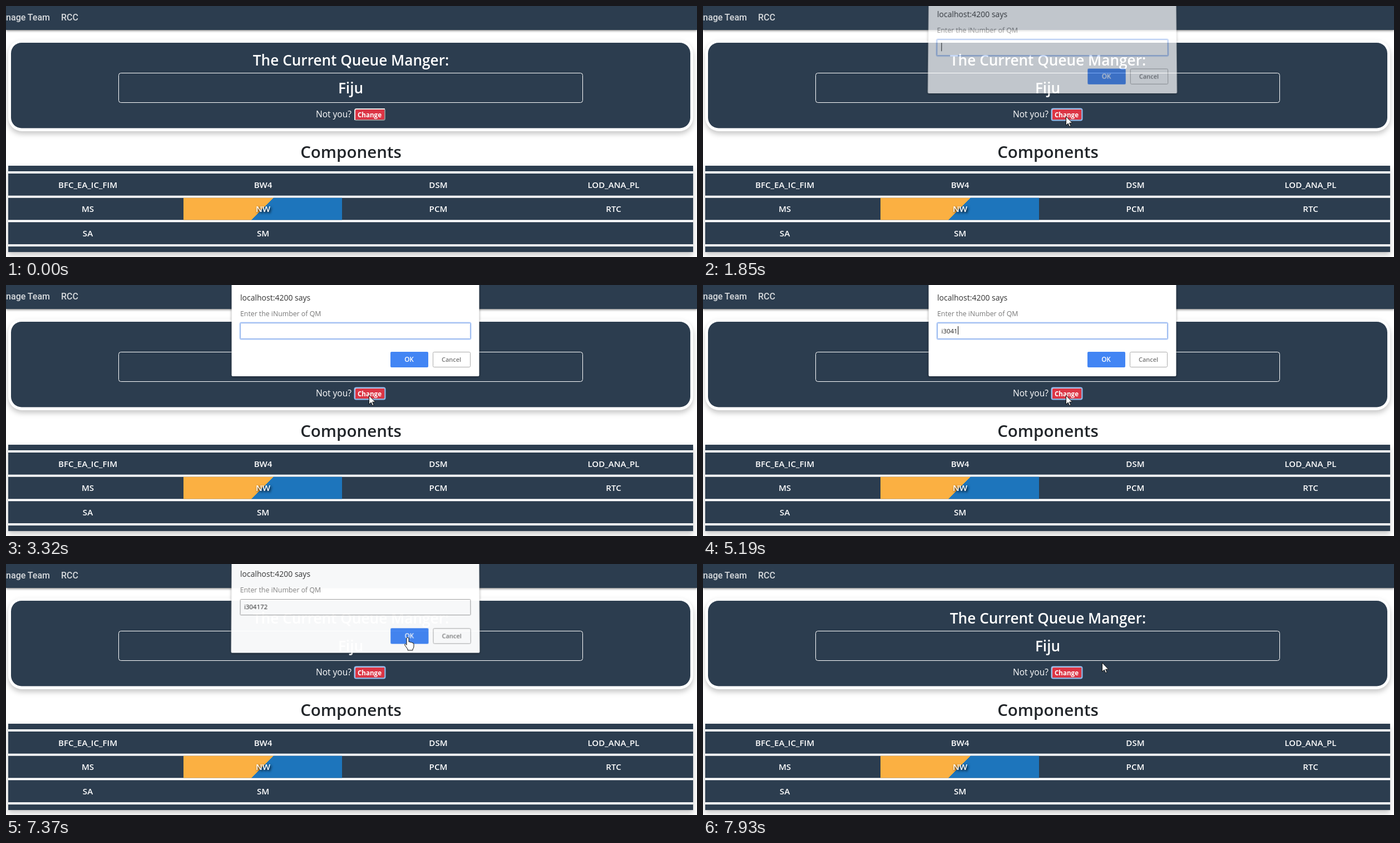
These frames come from a looping animation (1242 px wide and 451 px high, 7990 ms). An HTML page:

```html
<!DOCTYPE html>
<html lang="en">
<head>
<meta charset="utf-8">
<title>Queue manager</title>
<style>
  html, body { margin: 0; width: 100%; height: 100%; overflow: hidden; background: #fff; }
  svg { position: absolute; left: 0; top: 0; width: 1242px; height: 451px; }
  text { font-family: "Open Sans", "Noto Sans", sans-serif; fill: #fff; }
  .mid { text-anchor: middle; }
  .semi { font-weight: 600; }
  .dark { fill: #2c3d4f; }
  .nav { font: 500 16px Roboto, sans-serif; fill: #d7dadd; }
  .big { font-size: 26.2px; }
  .cell { font-size: 15.1px; }
  .raised { filter: drop-shadow(0 5px 5px rgba(0, 0, 0, .22)); }
  #dialog { transform-origin: 628px 0; }
  #sheet { filter: drop-shadow(0 1px 2px rgba(0, 0, 0, .4)); }
</style>
</head>
<body>
<svg id="page">
  <defs>
    <linearGradient id="split" gradientUnits="userSpaceOnUse" x1="442" y1="345" x2="481" y2="384">
      <stop offset=".5" stop-color="#fbb042"/>
      <stop offset=".5" stop-color="#1d75bc"/>
    </linearGradient>
  </defs>

  <rect class="dark" width="1242" height="43" style="filter: drop-shadow(0 1px 2px rgba(0,0,0,.6))"/>
  <text class="nav" x="79" y="26" text-anchor="end">Manage Team</text>
  <text class="nav" x="99" y="26">RCC</text>

  <rect class="raised" x="4" y="61" width="1231" height="164" rx="25" fill="#fff"/>
  <rect class="dark" x="9" y="66" width="1221" height="153.5" rx="19"/>
  <text class="mid semi big" x="620" y="107">The Current Queue Manger:</text>
  <rect x="202.5" y="120.5" width="834" height="53" rx="4" fill="none" stroke="#fff"/>
  <text class="mid semi big" x="619.5" y="157">Fiju</text>
  <text x="557" y="200" font-size="15.5">Not you?</text>
  <rect x="627" y="185" width="54" height="20" rx="3" fill="#dc3545"/>
  <g fill="none" stroke-width="2">
    <path d="M681 186V202Q681 205 678 205H628" stroke="#8d8f92"/>
    <path d="M627 205V188Q627 185 630 185H681" stroke="#e8e8e8"/>
    <rect id="ring" x="626.5" y="184.5" width="55" height="21" rx="3" stroke="#8fb6ea"/>
  </g>
  <text class="mid" x="653.5" y="200" font-size="11.6" font-weight="700">Change</text>

  <text class="mid semi" x="620" y="273" font-size="29.5" style="fill:#212529">Components</text>
  <g id="table">
    <rect class="raised" x="4" y="287" width="1231" height="155" fill="#fff"/>
  </g>
</svg>

<svg id="dialog">
  <rect id="sheet" x="405.5" y="-12" width="445" height="176" rx="2" fill="#fff"/>
  <text x="421" y="28" font-size="14" style="fill:#333">localhost:4200 says</text>
  <text x="421" y="56" font-size="12.3" style="fill:#777">Enter the iNumber of QM</text>
  <rect id="glow" x="421" y="68" width="414" height="29" rx="2" fill="none" stroke="#b4cdf8" stroke-width="3"/>
  <rect id="field" x="421.5" y="68.5" width="413" height="28" rx="1" fill="#fff"/>
  <text id="typed" x="428.5" y="86.5" font-size="11.4" style="fill:#222"></text>
  <rect id="caret" y="74" width="1" height="15" fill="#111"/>
  <rect x="691" y="120" width="68" height="28" rx="2" fill="#4285f4"/>
  <text class="mid semi" x="724.5" y="138" font-size="11.7">OK</text>
  <rect x="767.5" y="120.5" width="67" height="27" rx="2" fill="#fff" stroke="#aaa"/>
  <text class="mid semi" x="800.5" y="138" font-size="11" style="fill:#777">Cancel</text>
</svg>

<svg id="pointer">
  <g id="cursor" stroke="#111" fill="#fff" stroke-linejoin="round">
    <path id="arrow" d="M.5 .5V16.5L4.2 13L6.6 18.6L9 17.6L6.6 12.2H11.7Z"/>
    <path id="hand" transform="translate(-2 -4)" d="M0 1q2 0 2 2v6q2-.8 3 .8q2-.8 3 .8q3-.4 3 2.4v4q0 3-2 5v2h-9v-2l-5-7q-1.5-2 .5-2.5q1 0 2.5 2V3q0-2 2-2z"/>
  </g>
</svg>

<script>
const LOOP = 7990;
const USER_ID = 'i304172';
const KEY_TIMES = [3490, 3780, 4010, 4870, 5190, 5800, 5950];
const BLINK = 530;
const OPEN = 1700, CLOSE = 7280, CLOSED = 7520;

// The pointer rests at each stop until the next move begins
const HOME = [1036, 407];
const MOVES = [
  { from: 300, until: 920, steps: 8, to: [652, 198] },
  { from: 6420, until: 6500, steps: 1, to: [706, 196] },
  { from: 6650, until: 7050, steps: 5, to: [724, 135] },
  { from: 7610, until: 7930, steps: 4, to: [717, 177] }
];

const $ = id => document.getElementById(id);
const show = (id, on) => $(id).style.display = on ? '' : 'none';

// Progress from 0 to 1 in equal jumps
function stepped(t, from, until, steps) {
  const done = Math.floor((t - from) / (until - from) * steps + 1e-6) / steps;
  return Math.min(1, Math.max(0, done));
}

function add(tag, attrs, text = '') {
  const node = document.createElementNS('http://www.w3.org/2000/svg', tag);
  for (const key in attrs) node.setAttribute(key, attrs[key]);
  node.textContent = text;
  $('table').append(node);
  return node;
}

function buildTable() {
  const rows = [
    [], ['BFC_EA_IC_FIM', 'BW4', 'DSM', 'LOD_ANA_PL'],
    ['MS', 'NW', 'PCM', 'RTC'], ['SA', 'SM'], []
  ];
  let y = 287;
  for (const names of rows) {
    const height = names.length ? 39.7 : 10;
    add('rect', { class: 'dark', x: 4, y, width: 1231, height });
    names.forEach((name, i) => {
      const marked = name === 'NW';
      if (marked) add('rect', { x: 319, y, width: 285, height, fill: 'url(#split)' });
      const label = add('text', { class: 'mid semi cell', x: 147 + 315 * i, y: y + 25.7 }, name);
      if (marked) label.style.textShadow = '2px 2px 4px #000';
    });
    y += height + 4;
  }
}

function drawDialog(t) {
  const opening = stepped(t, OPEN, 2000, 4);
  const closing = stepped(t, CLOSE, CLOSED, 3);
  const tilt = 1.6 * (1 - opening) + 1.5 * closing;
  $('dialog').style.opacity = Math.sin(opening * Math.PI / 2) * (1 - closing ** 3);
  $('dialog').style.transform = tilt
    ? `translateY(${-10 * tilt}px) perspective(1000px) rotateX(${3 * tilt}deg)` : 'none';

  const focused = t < CLOSE;
  show('glow', focused);
  $('field').setAttribute('stroke', focused ? '#8fb0ea' : '#999');

  // Each key press restarts the caret's blinking
  const pressed = KEY_TIMES.filter(time => time <= t);
  const lastKey = pressed.at(-1) ?? OPEN + 30;
  $('typed').textContent = USER_ID.slice(0, pressed.length);
  const width = pressed.length ? $('typed').getComputedTextLength() : 0;
  $('caret').setAttribute('x', Math.round(429 + width));
  show('caret', focused && Math.floor((t - lastKey) / BLINK) % 2 === 0);
}

function drawPointer(t) {
  let [x, y] = HOME;
  for (const { from, until, steps, to } of MOVES) {
    const u = stepped(t, from, until, steps) - 1;
    x += (to[0] - x) * (1 + 2.15 * u ** 3 + 1.15 * u ** 2); // slight overshoot
    y += (to[1] - y) * (1 + u ** 3);
  }
  const overLink = t >= 7360 && t < 7690;
  show('cursor', t >= MOVES[0].from);
  show('arrow', !overLink);
  show('hand', overLink);
  $('cursor').setAttribute('transform', `translate(${x} ${y})`);
}

const start = performance.now();
function tick() {
  const t = (performance.now() - start) % LOOP;
  show('ring', t >= OPEN);
  drawDialog(t);
  drawPointer(t);
  requestAnimationFrame(tick);
}
buildTable();
tick();
</script>
</body>
</html>
```
